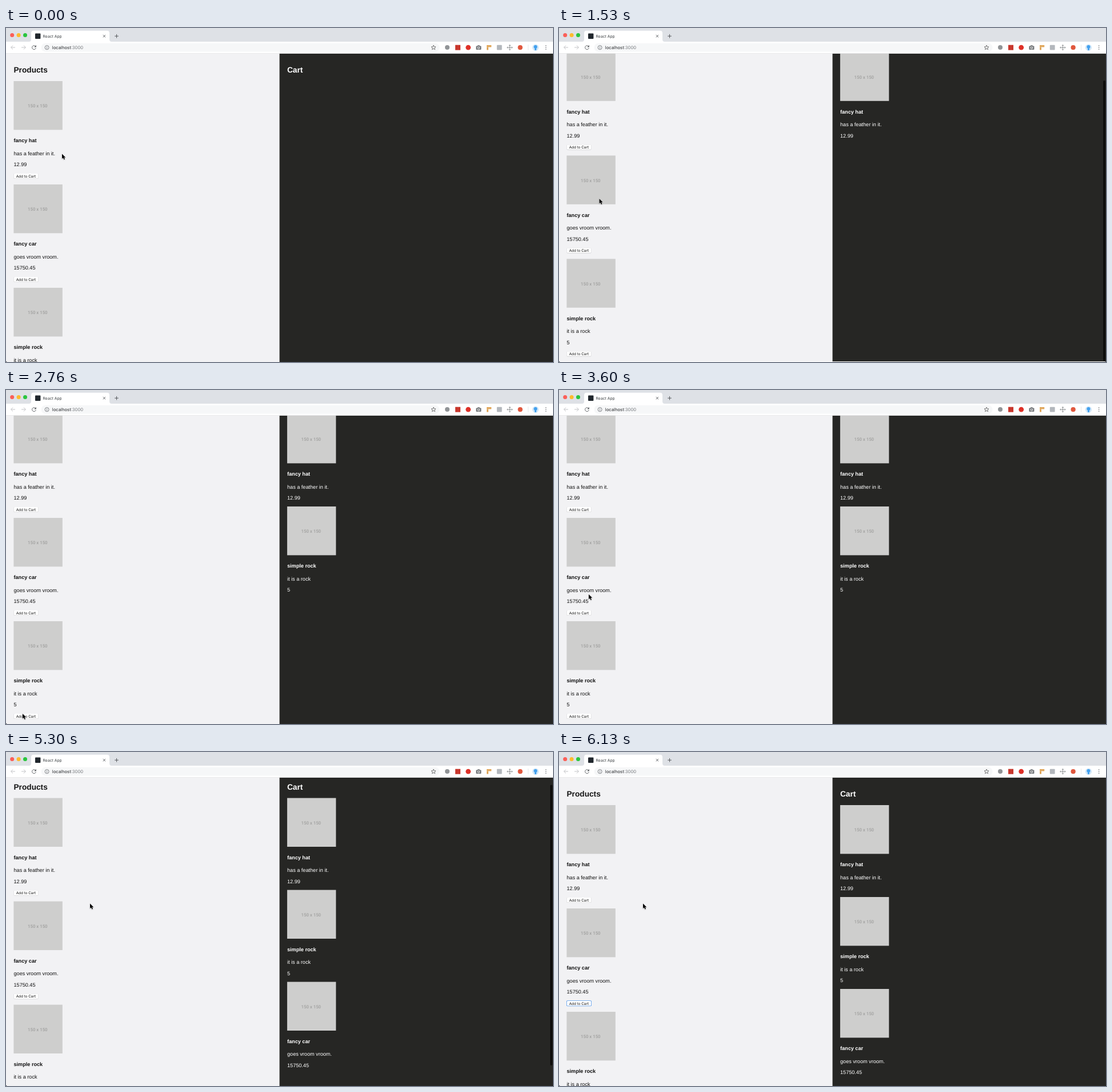
An HTML page with a canvas that plays this animation: 957 by 585 pixels, repeating every 6.7 s.

```html
<!DOCTYPE html>
<html lang="en">
<head>
<meta charset="utf-8">
<title>Shopping cart</title>
<style>
html, body { margin: 0; width: 100%; height: 100%; overflow: hidden; background: #fff; }
canvas { display: block; width: 957px; height: 585px; }
</style>
</head>
<body>
<canvas id="stage" width="957" height="585"></canvas>
<script>
const ctx = document.getElementById('stage').getContext('2d');
const W = 957, H = 585, LOOP = 6700;
const PAGE_TOP = 44.6, SPLIT = 478.5, MAX_SCROLL = 50;
const BODY = '"Liberation Sans", Arial, sans-serif';
const UI = 'Inter, sans-serif';
const LEFT = 13.5, FIRST = 93, IMAGE = 85.4, ROW = 181, CART_ROW = 161;

const hat = { name: 'fancy hat', text: 'has a feather in it.', price: '12.99' };
const car = { name: 'fancy car', text: 'goes vroom vroom.', price: '15750.45' };
const rock = { name: 'simple rock', text: 'it is a rock', price: '5' };
const products = [hat, car, rock];

// Each purchase: button pressed, then released with the item added.
const purchases = [
  { item: hat, press: 700, add: 800 },
  { item: rock, press: 2630, add: 2730 },
  { item: car, press: 4360, add: 4460 }
];

// Keyframes: time, then values.
const pointerPath = [
  [0, 98, 220.5], [29, 98, 220.5], [30, 96, 222], [190, 96, 222],
  [370, 66, 245], [560, 42, 256], [1090, 42, 256], [1160, 70.5, 299],
  [1810, 70.5, 299], [2030, 29, 465], [2460, 29, 567], [3040, 29, 567],
  [3300, 61, 455], [3600, 52, 358], [3730, 50, 348], [3900, 47, 345],
  [4120, 37, 370], [4360, 29.5, 388], [4680, 29.5, 388], [4830, 147, 265.5]
];
const scrollPath = [
  [1385, 0], [1450, 22], [1530, 50.6], [2320, 50.6], [2350, 50],
  [5140, 50], [5300, 12.5], [5400, 3], [5540, 0]
];
const barPath = [
  [1385, 0], [1410, 1], [2200, 1], [2440, 0],
  [5130, 0], [5160, 1], [5900, 1], [6130, 0]
];

function sample(path, t) {
  if (t <= path[0][0]) return path[0].slice(1);
  for (let i = 1; i < path.length; i++) {
    const a = path[i - 1], b = path[i];
    if (t < b[0]) {
      const k = (t - a[0]) / (b[0] - a[0]);
      return a.slice(1).map((v, j) => v + (b[j + 1] - v) * k);
    }
  }
  return path[path.length - 1].slice(1);
}

function rect(x, y, w, h, color) {
  ctx.fillStyle = color;
  ctx.fillRect(x, y, w, h);
}

function round(x, y, w, h, r, color) {
  ctx.fillStyle = color;
  ctx.beginPath();
  ctx.roundRect(x, y, w, h, r);
  ctx.fill();
}

function disc(x, y, r, color) {
  ctx.fillStyle = color;
  ctx.beginPath();
  ctx.arc(x, y, r, 0, Math.PI * 2);
  ctx.fill();
}

function stroke(d, color, width = 0.9) {
  ctx.strokeStyle = color;
  ctx.lineWidth = width;
  ctx.stroke(new Path2D(d));
}

function label(str, x, y, font, color) {
  ctx.font = font;
  ctx.fillStyle = color;
  ctx.fillText(str, x, y);
}

function star(x, y, r) {
  let d = '';
  for (let i = 0; i < 10; i++) {
    const a = i * Math.PI / 5 - Math.PI / 2, q = i % 2 ? r * 0.45 : r;
    d += (i ? 'L' : 'M') + (x + q * Math.cos(a)) + ' ' + (y + q * Math.sin(a));
  }
  stroke(d + 'Z', '#555', 0.8);
}

function drawToolbarIcons() {
  stroke('M16 34H8.7M12 30.6L8.6 34L12 37.4M27 34H34.3M31 30.6L34.4 34L31 37.4', '#bbbdc0');
  stroke('M51.7 32.1A3.4 3.4 0 1 0 52.3 35', '#55585c');
  ctx.fillStyle = '#55585c';
  ctx.fill(new Path2D('M52.8 30V33.5H49.3Z'));
  stroke('M75.1 34.2A3.5 3.5 0 1 1 68.1 34.2A3.5 3.5 0 1 1 75.1 34.2M71.6 33.6V36.2M71.6 32V32.8', '#5f6368', 0.8);
  star(748, 34.3, 4.2);
  disc(772, 34, 4, '#919497');
  rect(786, 29.7, 9, 9, '#c8372d');
  disc(808.7, 34.2, 4.4, '#de3027');
  round(822.4, 31.4, 9, 6.5, 1, '#74777a');
  rect(825, 30.3, 3.8, 2, '#74777a');
  disc(826.9, 34.6, 2.2, '#fff');
  disc(826.9, 34.6, 1.3, '#74777a');
  rect(841, 30, 8.2, 3.5, '#e0a75c');
  rect(841, 33.5, 3, 5, '#e0a75c');
  round(858.8, 29.8, 8.8, 8.8, 1, '#b3b7bc');
  stroke('M876.8 34.2H886M881.4 29.6V38.8M879.9 31L881.4 29.5L882.9 31M879.9 37.4L881.4 38.9L882.9 37.4M878.2 32.7L876.7 34.2L878.2 35.7M884.6 32.7L886.1 34.2L884.6 35.7', '#777a7d', 0.8);
  disc(899.6, 34.2, 4.1, '#e0573d');
  rect(913, 29, 0.6, 10, '#d9dbde');
  disc(926.4, 34.2, 5.6, '#cfe6f8');
  disc(926.4, 33, 3, '#42a0ee');
  rect(925, 35, 2.8, 4, '#42a0ee');
  for (const y of [31.1, 34.2, 37.3]) disc(944.6, y, 0.8, '#5f6368');
}

function drawBrowser() {
  rect(0, 0, W, 24, '#dee1e6');
  rect(0, 24, W, PAGE_TOP - 24, '#fff');
  ['#fb5f58', '#fdbb2d', '#2ac53f'].forEach((c, i) => disc(10.7 + i * 11.4, 12.6, 3.5, c));
  ctx.fillStyle = '#fff';
  ctx.fill(new Path2D('M40 24Q44 24 44 20V9Q44 4.7 48 4.7H177Q181 4.7 181 9V20Q181 24 185 24Z'));
  round(51, 9.6, 9.4, 9.4, 1, '#20262c');
  label('React App', 64.6, 16.6, '6.8px ' + UI, '#3c4043');
  stroke('M169.7 12.1L174 16.4M174 12.1L169.7 16.4', '#55585c');
  stroke('M190.2 14.2H196.8M193.5 10.9V17.5', '#55585c', 1);
  round(61.5, 26.8, 697, 14.6, 7.3, '#f6f7f8');
  label('localhost', 80.8, 36.9, '7.7px ' + UI, '#26282b');
  const w = ctx.measureText('localhost').width;
  label(':3000', 80.8 + w, 36.9, '7.7px ' + UI, '#777a7e');
  drawToolbarIcons();
  rect(0, 44, W, 0.6, '#dcdee0');
}

function drawItem(item, x, y, color) {
  rect(x - 0.1, y, IMAGE, IMAGE, '#cececd');
  label('150 x 150', x + 24.6, y + 46.3, '500 7.8px Roboto, sans-serif', '#a0a09f');
  label(item.name, x, y + 107.4, 'bold 9.12px ' + BODY, color);
  label(item.text, x, y + 129.7, '9.12px ' + BODY, color);
  label(item.price, x, y + 149.1, '9.12px ' + BODY, color);
}

function drawButton(y, pressed, focused) {
  const x = LEFT, w = 43, h = 8.8;
  if (focused) round(x - 0.5, y - 0.6, w + 1, h + 1.2, 2, '#5a9cec');
  else round(x, y + 0.2, w, h + 0.2, 1.6, '#cbcbcd');
  round(x + 0.3, y + 0.2, w - 0.6, h - 0.4, 1.5, pressed ? '#3d8bf2' : '#fff');
  label('Add to Cart', x + 4.2, y + 6.7, '6.35px ' + UI, pressed ? '#fff' : '#111');
}

function drawPage(t, scroll) {
  ctx.save();
  ctx.beginPath();
  ctx.rect(0, PAGE_TOP, W, H - PAGE_TOP);
  ctx.clip();
  const bottom = scroll > MAX_SCROLL ? 584 : H;
  rect(0, PAGE_TOP, SPLIT, bottom - PAGE_TOP, '#f2f2f4');
  rect(SPLIT, PAGE_TOP, W - SPLIT, bottom - PAGE_TOP, '#262624');

  const cartX = SPLIT + LEFT;
  label('Products', LEFT, 78 - scroll, 'bold 13.68px ' + BODY, '#151515');
  label('Cart', cartX, 78 - scroll, 'bold 13.68px ' + BODY, '#fff');
  products.forEach((item, i) => {
    const y = FIRST + i * ROW - scroll;
    const deal = purchases.find(p => p.item === item);
    drawItem(item, LEFT, y, '#111');
    drawButton(y + 161.8, t >= deal.press && t < deal.add, item === car && t >= 5930);
  });
  purchases.filter(p => t >= p.add).forEach((p, i) =>
    drawItem(p.item, cartX, FIRST + i * CART_ROW - scroll, '#fff'));

  ctx.globalAlpha = sample(barPath, t)[0];
  const offset = Math.min(scroll, MAX_SCROLL) * 0.92;
  round(952, 46 + offset, 4, 491.5, 2, '#0d0d0c');
  ctx.restore();
}

function overText(x, y, scroll) {
  const depth = y + scroll - FIRST;
  const row = Math.floor(depth / ROW), item = products[row];
  if (!item) return false;
  const local = depth - row * ROW;
  const lines = [[item.name, 99, 'bold '], [item.text, 121.5, ''], [item.price, 141, '']];
  return lines.some(([str, top, weight]) => {
    ctx.font = weight + '9.12px ' + BODY;
    return local > top && local < top + 10.5 && x > LEFT && x < LEFT + ctx.measureText(str).width;
  });
}

function drawPointer(x, y, beam) {
  ctx.save();
  ctx.translate(x, y);
  if (beam) {
    stroke('M-1.7 -4.3Q0 -4.3 0 -3V3Q0 4.3 -1.7 4.3M1.7 -4.3Q0 -4.3 0 -3M0 3Q0 4.3 1.7 4.3M-1 1.3H1', '#222', 0.8);
  } else {
    const arrow = new Path2D('M0 0V8.6L2 6.8L3.4 10L5 9.3L3.6 6.2H6.2Z');
    ctx.shadowColor = 'rgba(0,0,0,.3)';
    ctx.shadowBlur = 1.5;
    ctx.shadowOffsetY = 0.6;
    ctx.strokeStyle = '#fff';
    ctx.lineWidth = 1;
    ctx.stroke(arrow);
    ctx.shadowColor = 'transparent';
    ctx.fillStyle = '#000';
    ctx.fill(arrow);
  }
  ctx.restore();
}

function drawCorners() {
  ctx.fillStyle = '#111';
  ctx.fill(new Path2D('M0 582.5Q0 585 2.5 585H0ZM957 582.5Q957 585 954.5 585H957Z'));
}

function draw(t) {
  rect(0, 0, W, H, '#fff');
  const [scroll] = sample(scrollPath, t);
  const [x, y] = sample(pointerPath, t);
  drawPage(t, scroll);
  drawBrowser();
  drawCorners();
  drawPointer(x, y, overText(x, y, scroll));
}

ctx.textRendering = 'geometricPrecision';
const start = performance.now();
function tick() {
  draw((performance.now() - start) % LOOP);
  requestAnimationFrame(tick);
}
tick();
</script>
</body>
</html>
```
